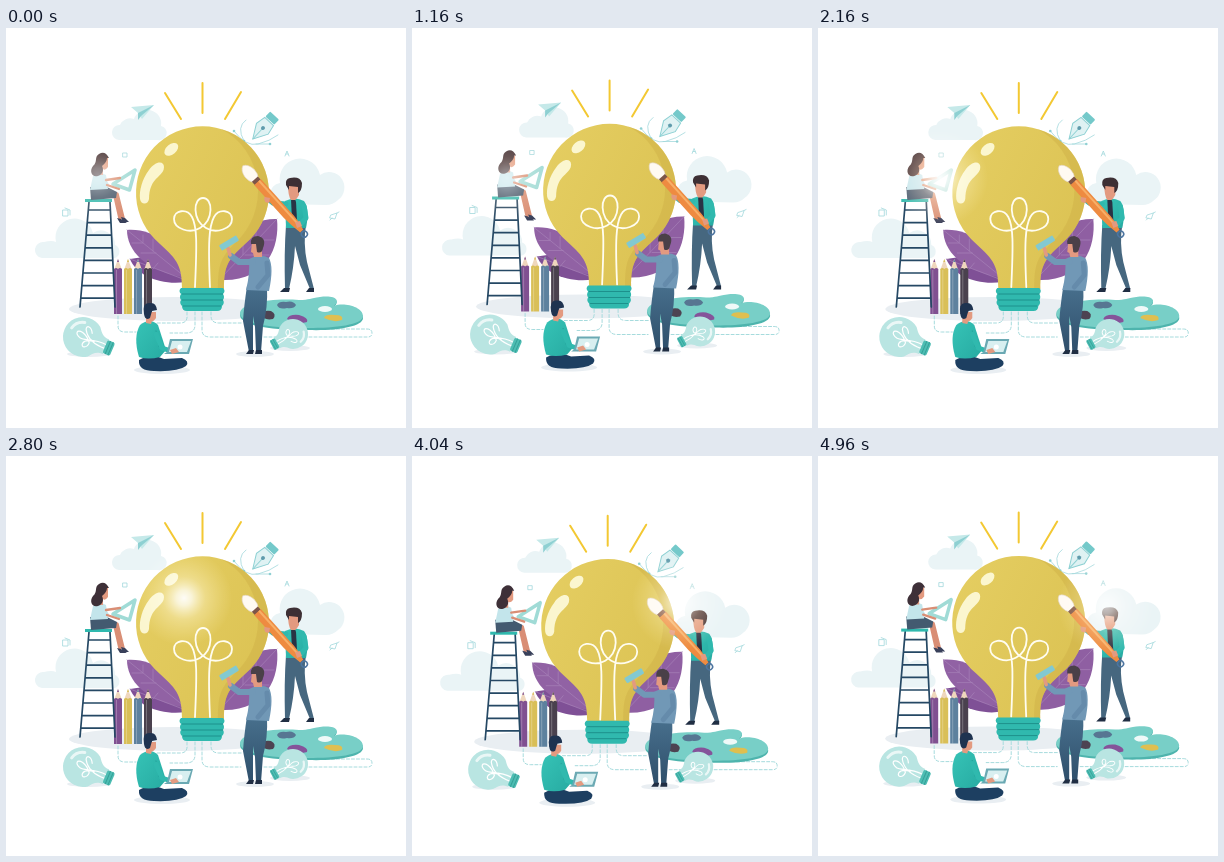
These frames come from a looping animation (400x400 px, 5000 ms). An HTML page:

```html
<!DOCTYPE html>
<html lang="en">
<head>
<meta charset="utf-8">
<title>Idea workshop</title>
<style>
  html, body { margin: 0; width: 100%; height: 100%; overflow: hidden; background: #fff; }
  svg { display: block; width: 100vw; height: 100vh; }
  .line { fill: none; stroke-linecap: round; stroke-linejoin: round; }
  .cloud { fill: #eaf4f6; }
  .skin { fill: #e39a80; }
  .teal { fill: #30b9ae; }
  #shine { mix-blend-mode: screen; }
</style>
</head>
<body>
<svg viewBox="0 0 400 400">
  <defs>
    <radialGradient id="glow">
      <stop offset="0" stop-color="#fff"/>
      <stop offset=".16" stop-color="#fffaf0" stop-opacity=".85"/>
      <stop offset=".45" stop-color="#f3c9a4" stop-opacity=".45"/>
      <stop offset="1" stop-color="#e8b080" stop-opacity="0"/>
    </radialGradient>
    <linearGradient id="glass" x1="0" y1="0" x2="1" y2=".6">
      <stop offset="0" stop-color="#e5ce62"/>
      <stop offset="1" stop-color="#dcc354"/>
    </linearGradient>
    <linearGradient id="shirt" x1="0" y1="0" x2="1" y2="1">
      <stop offset="0" stop-color="#36c3b6"/>
      <stop offset="1" stop-color="#27aba2"/>
    </linearGradient>
    <linearGradient id="trousers" x1="0" y1="0" x2="0" y2="1">
      <stop offset="0" stop-color="#48708d"/>
      <stop offset="1" stop-color="#2f4f6b"/>
    </linearGradient>
    <g id="lamp">
      <path fill="#b9e5e2" d="M25 8C18 8 16 11 12 16A20 20 0 1 1 12-16C16-11 18-8 25-8Z"/>
      <path class="line" stroke="#fff" stroke-width="1.2" d="M25-2C10-3 3 3-2 2C-9 0-9-5-2-4C2-3 5-1 8 3M25 2C10 3 3-3 0-8C-2-13 4-13 7-7M8 3C8 9 2 11 2 6Q3 1 12 0"/>
      <path class="line" stroke="#fff" opacity=".7" stroke-width="3" d="M-14-4Q-12-12-4-14"/>
      <rect x="24" y="-7" width="8" height="14" rx="2" fill="#4dbdb3"/>
      <path stroke="#35a198" d="M27-7V7M30-7V7"/>
    </g>
  </defs>

  <rect width="400" height="400" fill="#fff"/>
  <g id="scene">
    <g fill="#e9eef2">
      <ellipse cx="170" cy="281" rx="107" ry="12"/>
      <ellipse cx="83" cy="326" rx="22" ry="3"/>
      <ellipse cx="156" cy="342" rx="28" ry="4"/>
      <ellipse cx="249" cy="326" rx="19" ry="3"/>
      <ellipse cx="284" cy="320" rx="20" ry="3"/>
    </g>

    <path class="cloud" d="M113 112A7 7 0 0 1 114 97A11 11 0 0 1 128 91A14 14 0 0 1 155 98A7 7 0 0 1 152 112Z"/>
    <path class="cloud" d="M36 230A8 8 0 0 1 38 214Q46 212 50 214A19 19 0 0 1 87 205A14 14 0 0 1 109 217A7 7 0 0 1 109 230Z"/>
    <path class="cloud" d="M276 176A10 10 0 0 1 274 155A20 20 0 0 1 314 147A15 15 0 0 1 332 172Q327 177 320 177Z"/>

    <path class="line" stroke="#f3c832" stroke-width="2" d="M159 65L175 91M196.500 55V85M235 64L219 91"/>

    <path fill="#c5e9e9" d="M125 79L148 77L136 91L132 85Z"/>
    <path fill="#8ed0d2" d="M148 77L132 85L132 92L135 88Z"/>

    <g class="line" stroke="#a3d9dc" stroke-width=".8">
      <path d="M228 103Q240 119 252 116T272 107M240 92Q230 99 238 113M250 116H264"/>
      <path d="M117 125h4v4h-4ZM57 182h5v6h-5ZM59 180l5 2v5M325 187l6-2l-2 6l-5-1ZM326 190l-2 2M331 185l2-1"/>
      <path d="M279 128l2-5l2 5M280 126h2"/>
    </g>
    <g fill="#8fd0d3">
      <circle cx="228" cy="103" r="1.300"/><circle cx="238" cy="113" r="1.300"/><circle cx="264" cy="116" r="1.300"/>
    </g>
    <g transform="translate(257 100) rotate(43)">
      <path fill="#dff2f3" stroke="#8dd0d3" d="M-6-9H6L8 1L0 15L-8 1Z"/>
      <path stroke="#8dd0d3" d="M0 15V1"/>
      <circle r="2" fill="#5f9bac"/>
      <rect x="-6" y="-17" width="12" height="7" rx="1" fill="#74c9ca"/>
    </g>

    <g class="line" stroke="#a6dbdd" stroke-dasharray="3 2">
      <path d="M112 288V298Q112 304 119 304H130M181 284V289Q181 295 174 295H151M189 284V297Q189 305 180 305H164"/>
      <path d="M196 284V302Q196 309 204 309H235M205 284V288Q205 295 213 295H236M258 309H362Q366 309 366 305Q366 301 361 301H320"/>
    </g>

    <path fill="#4eb4ad" d="M234 287C235 276 264 271 293 273C304 273 304 271 314 270C331 268 334 274 328 279C338 275 357 281 357 290C357 299 329 303 302 302C271 302 234 299 234 287Z"/>
    <path fill="#78cfc7" d="M234 285C235 275 264 270 293 272C304 272 304 270 314 269C331 267 334 273 328 278C338 274 357 279 357 288C357 297 329 300 302 300C271 300 234 297 234 285Z"/>
    <ellipse cx="319" cy="281" rx="7" ry="3" fill="#eff9f8"/>
    <path fill="#577692" d="M271 277Q273 273 280 274Q287 272 290 277Q288 281 281 280Q273 282 271 277Z"/>
    <path fill="#4d4352" d="M254 286Q257 282 265 283Q271 286 267 291Q258 293 254 286Z"/>
    <path fill="#85539a" d="M281 291Q283 286 293 287Q303 290 301 294Q291 297 281 291Z"/>
    <path fill="#dfbf50" d="M318 290Q319 286 329 287Q338 287 336 292Q328 295 318 290Z"/>
    <use href="#lamp" transform="translate(287 306) rotate(151) scale(.75)"/>
    <use href="#lamp" transform="translate(77 309) rotate(23)"/>

    <path fill="#7f5096" d="M180 254C155 258 130 247 124 231C145 226 169 233 180 250Z"/>
    <path fill="#9162a4" d="M181 248C173 218 147 200 121 202C121 222 138 243 181 250Z"/>
    <path fill="#8f5fa2" d="M215 247C214 217 239 190 271 191C274 220 260 254 215 252Z"/>
    <path class="line" stroke="#a681b8" stroke-width=".7" d="M121 202L178 248M137 214V207M147 223V211M137 215H126M150 225H135M124 231L177 251M147 241L152 235M215 250L271 191M237 227V208M250 214V198M239 227H263M252 212H268"/>

    <path fill="url(#glass)" d="M176 261C176 239 172 232 154 216A66.500 66.500 0 1 1 239 216C221 232 218 239 218 261Z"/>
    <path fill="#cfb248" opacity=".5" d="M215 101A66.500 66.500 0 0 1 239 216C221 232 218 239 218 261H212C212 238 214 230 229 215A64 68 0 0 0 215 101Z"/>
    <ellipse cx="165" cy="121.500" rx="8" ry="5" transform="rotate(-40 165 121)" fill="#fbf6cf"/>
    <path fill="#fbf6cf" d="M158 139C158 132 149 133 143 142C136 151 133 163 134 171C135 177 142 177 143 171C143 161 146 154 152 149C156 145 158 143 158 139Z"/>
    <path class="line" stroke="#fffdf0" stroke-width="1.800" d="M189 259C191 215 191 198 186 189C181 180 168 182 168 191C168 201 184 206 194 200C208 192 207 170 197 170C187 170 186 192 200 200C210 206 226 201 226 191C226 182 213 180 208 189C203 198 202 215 204 259"/>
    <path class="teal" d="M175 260H217Q220 263 217 266Q219 269 217 272Q219 275 216 278Q216 283 211 283H181Q176 283 176 278Q173 275 175 272Q173 269 175 266Q172 263 175 260Z"/>
    <path stroke="#1d918c" d="M176 266H217M176 272H217M177 278H215"/>

    <g id="pencils"></g>
    <path id="ladder" class="line" stroke="#254864" stroke-width="1.700"/>
    <rect class="teal" x="79" y="171" width="27" height="3"/>

    <!-- woman with set square -->
    <path class="line" stroke="#a0dbd6" stroke-width="3.500" d="M107 156L129 142L123.500 162Z"/>
    <path class="line" stroke="#d98e75" stroke-width="3.500" d="M98 165L109 168L114 190M96 164L111 166L117 190"/>
    <path fill="#39405a" d="M111 190L115 191L121 195H114ZM115 189L119 190L123 194H117Z"/>
    <path fill="#435a70" d="M84 159L101 159L111 164L110 170L85 172Z"/>
    <path fill="#c3e5eb" d="M87 148Q94 143 100 147L102 161L84 162Z"/>
    <path class="line" stroke="#c3e5eb" stroke-width="4" d="M97 150L101 157"/>
    <path class="line" stroke="#d98e75" stroke-width="2.300" d="M101 157L113 161M100 152L114 150"/>
    <path class="skin" d="M95 130h7v9q-3 4-5 2v6h-4z"/>
    <path fill="#3e3038" d="M103 130Q99 122 93 126C88 129 92 134 87 138C83 143 86 150 92 148C97 146 98 142 96 138Q101 134 101 130Z"/>

    <!-- seated man -->
    <path fill="#1d3f61" d="M133 332Q146 325 158 331L176 330Q184 333 180 338Q172 344 148 343Q132 343 133 332Z"/>
    <path fill="url(#shirt)" d="M134 297Q144 289 152 297L160 322L154 329Q142 332 133 329Q127 309 134 297Z"/>
    <path class="line" stroke="#1b918d" stroke-width=".8" d="M150 303L153 319L164 325"/>
    <path class="line" stroke="#30b9ae" stroke-width="5" d="M150 306L156 320L165 323"/>
    <path class="skin" d="M140 284h10v6q-3 4-4 3l-1 3l-5-1z"/>
    <path fill="#1f3350" d="M151 282Q150 274 144 275Q136 274 138 286Q139 293 144 290L146 283Z"/>
    <path fill="#6ba9b3" d="M164 311H187L183 326H158L161 324Z"/>
    <path fill="#d8eff0" d="M166 313H185L181 324H163Z"/>
    <circle cx="174" cy="319" r="2.500" fill="#fff"/>
    <path class="skin" d="M164 322l6-2l3 4l-7 2z"/>

    <!-- man at the bulb -->
    <path fill="url(#trousers)" d="M241 258H261Q262 280 257 298L255 324H250L249 299L247 288L247 324H243L237 293Q238 278 241 258Z"/>
    <path fill="#202e43" d="M243 322h5l-1 4h-7zM250 322h6v4h-7z"/>
    <path fill="#7198b6" d="M243 231Q254 225 263 230Q268 239 263 263L240 262Q244 247 243 231Z"/>
    <path class="line" stroke="#7198b6" stroke-width="6" d="M247 234L233 234L225 228"/>
    <path class="line" stroke="#e39a80" stroke-width="3.500" d="M224 227L222 220"/>
    <path class="line" stroke="#658bab" stroke-width="5" d="M261 235L262 247L252 259"/>
    <path class="skin" d="M246 214h10v15h-8l-1-4l-2-1z"/>
    <path fill="#4a4048" d="M245 216Q244 208 252 208Q261 210 257 220Q256 226 251 224L250 216Z"/>
    <rect x="-10" y="-3" width="20" height="6" rx="1" fill="#82c9d1" transform="translate(223 215) rotate(-31)"/>

    <!-- man with brush -->
    <path fill="#46677f" d="M280 197H300Q297 215 301 234L308 261H304L294 237L289 218Q288 240 283 261H279Q278 224 280 197Z"/>
    <path fill="#202e43" d="M278 260h6l-1 4h-9zM303 260h5v4h-8z"/>
    <path fill="url(#shirt)" d="M279 173Q289 168 298 173Q304 181 300 200H280Z"/>
    <path fill="#293345" d="M285 171h4l1 3l1 18l-3 4l-2-4z"/>
    <path class="line" stroke="#30b9ae" stroke-width="5" d="M280 176L267 175L262 171M298 178L300 190L293 198"/>
    <path class="skin" d="M282 157h11v10q-3 5-4 5h-4q-3-4-3-15zM259 167l6 3l-2 5l-5-3z"/>
    <path fill="#3d2f34" d="M280 157Q279 151 284 150Q294 148 296 155Q296 163 292 165L292 159L283 158L283 162Z"/>
    <g transform="translate(237.500 138.500) rotate(48)">
      <path fill="#fffaf2" stroke="#e3d6c8" stroke-width=".6" d="M-1 0Q1-5 9-6Q15-6 18-3.500V3.500Q15 6 9 6Q1 5-1 0Z"/>
      <path fill="#7c5548" d="M17-4H22V4H17Z"/>
      <path fill="#ee8b41" d="M21-4.500H65Q76-5 87-2V2Q76 4 65 4.500H21Z"/>
      <path fill="#f8af67" d="M21-3H78V-1H21Z"/>
      <circle cx="91" r="3" fill="none" stroke="#4d75a0" stroke-width="1.500"/>
    </g>
    <path class="skin" d="M289 194l5-1l2 5l-5 2zM259 169l5 1l-1 5l-4-1z"/>
  </g>
  <circle id="shine" r="48" fill="url(#glow)"/>
</svg>

<script>
const $ = id => document.getElementById(id);
const LOOP = 5000, STEP = 40;

$("pencils").innerHTML = ["#805091", "#d9bf58", "#5d819e", "#4a414e"].map((color, i) => {
  const x = 108 + i * 10;
  return `<path fill="#efd7bd" d="M${x} 242L${x + 4} 231L${x + 8} 242Z"/>
    <path fill="${color}" d="M${x} 241q2-2 4 0q2-2 4 0v45h-8zM${x + 3} 234l1-3l1 3z"/>
    <path stroke="#fff" opacity=".25" d="M${x + 2.5} 242v44"/>`;
}).join("");

let ladder = "M83 174L74 279M104 174L109 279";
for (let y = 182; y < 275; y += 12.6) {
  const k = (y - 174) / 105;
  ladder += `M${83 - 9 * k} ${y}H${104 + 5 * k}`;
}
$("ladder").setAttribute("d", ladder);

// time, camera x, camera y, shine x, shine y, shine opacity
const keys = [
  [0, 0, 0, 92, 148, .5],
  [400, -1, 0, 92, 148, .5],
  [1160, 1.1, -2.5, 95, 150, .5],
  [1680, 4, -1, 106, 151, .7],
  [2160, 4.3, 0, 122, 150, .95],
  [2800, 0, 2, 178, 142, .95],
  [3360, -2.7, 3.7, 214, 145, .95],
  [4040, -.8, 4.7, 268, 146, .8],
  [4500, 2.8, 5.8, 282, 149, .75],
  [4960, 4.2, 1.6, 288, 150, .75]
];

const slope = (i, c) => {
  const a = keys[Math.max(i - 1, 0)], b = keys[Math.min(i + 1, keys.length - 1)];
  return (b[c] - a[c]) / (b[0] - a[0]);
};

// Smooth cubic through the keys
function sample(t, c) {
  let i = 0;
  while (i < keys.length - 2 && t >= keys[i + 1][0]) i++;
  const a = keys[i], b = keys[i + 1], d = b[0] - a[0];
  const u = (t - a[0]) / d, v = 1 - u;
  return a[c] * (1 + 2 * u) * v * v + b[c] * u * u * (3 - 2 * u)
    + d * u * v * (slope(i, c) * v - slope(i + 1, c) * u);
}

const start = performance.now();
function draw(now) {
  const t = Math.floor(Math.max(0, now - start) % LOOP / STEP) * STEP;
  const [x, y, shineX, shineY, opacity] = [1, 2, 3, 4, 5].map(c => sample(t, c));
  $("scene").setAttribute("transform", `translate(${x} ${y})`);
  $("shine").setAttribute("transform", `translate(${shineX} ${shineY})`);
  $("shine").setAttribute("opacity", opacity);
  requestAnimationFrame(draw);
}
draw(start);
</script>
</body>
</html>
```
